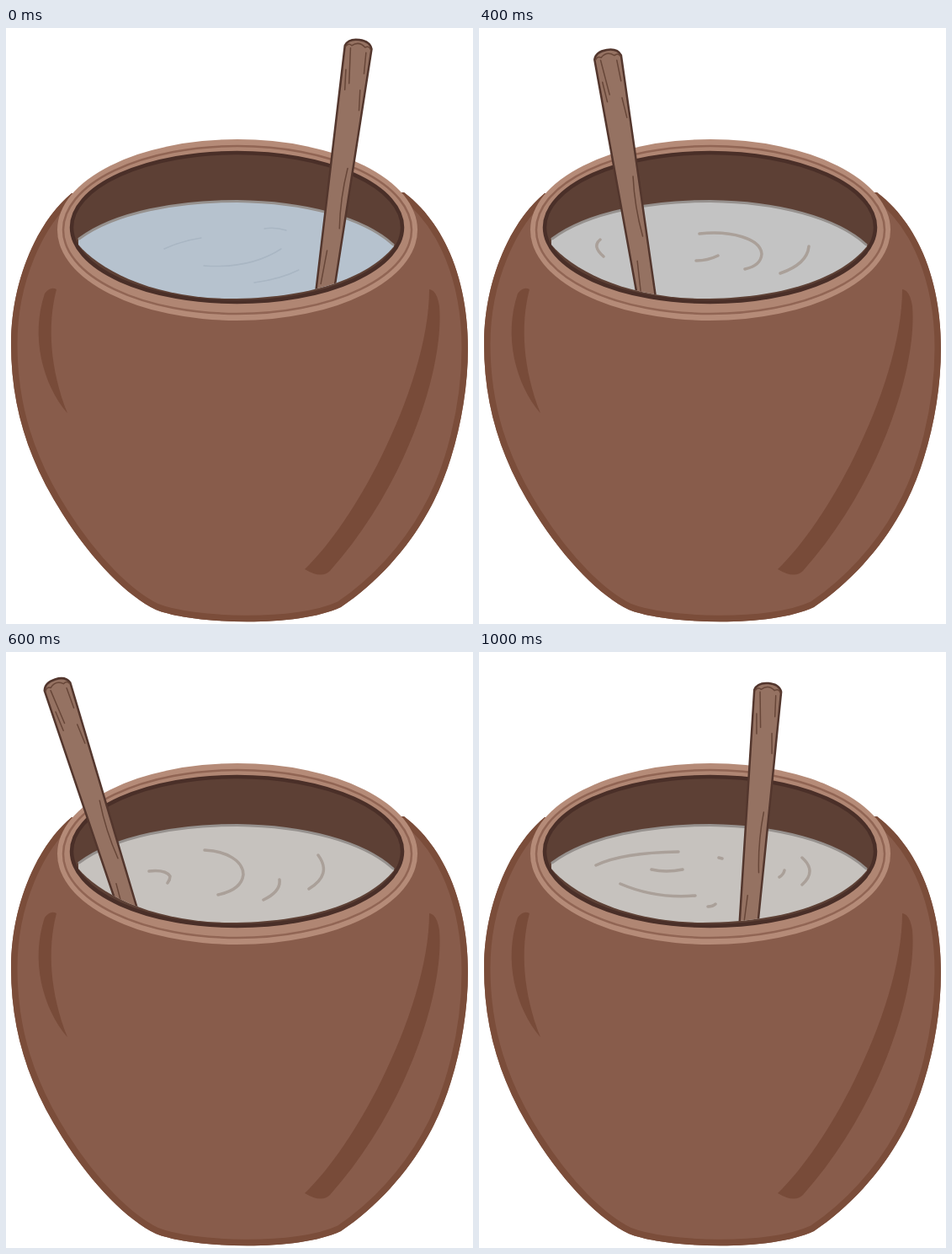
These frames come from a looping animation (555x707 px, 1.2 s). An HTML page:

```html
<!DOCTYPE html>
<html lang="en">
<head>
<meta charset="utf-8">
<title>Stirring pot</title>
<style>
  html, body { margin: 0; height: 100%; overflow: hidden; background: #fff; }
  svg { display: block; width: 100%; height: 100%; }
  path, ellipse { stroke-linecap: round; stroke-linejoin: round; }
</style>
</head>
<body>
<svg viewBox="0 0 555 707">
  <defs>
    <path id="body" d="M78 196C37 230 6 300 6 375C6 448 26 512 67 576C104 634 145 674 178 690
      C220 707 345 712 398 687C440 659 477 618 501 575C530 525 549 448 549 380C549 300 522 232 473 195Z"/>
    <clipPath id="inBody"><use href="#body"/></clipPath>
    <clipPath id="dip"><path d="M0 0H555V250H461V259C430 297 360 321 265 321C170 320 110 285 86 257V250H0Z"/></clipPath>
  </defs>

  <use href="#body" fill="#885c4b"/>
  <use href="#body" fill="none" stroke="#7b4d3a" stroke-width="15" clip-path="url(#inBody)"/>
  <path fill="#784b39" d="M46 315Q53 306 60 310C49 352 52 404 73 457C43 422 29 365 46 315Z"/>
  <path fill="#784b39" d="M503 310Q512 311 515 330C521 400 478 540 385 644Q375 654 355 642
    C420 580 503 418 503 310Z"/>

  <ellipse cx="275" cy="239.5" rx="214" ry="107.5" fill="#b58b78"/>
  <ellipse cx="275" cy="239.5" rx="207" ry="99.5" fill="#b08673" stroke="#916554" stroke-width="2.5"/>
  <ellipse cx="274.5" cy="236.5" rx="196.5" ry="88.5" fill="#5d4035" stroke="#4a2f28" stroke-width="4.5"/>

  <path id="water" d="M86 250C130 218 205 205 275 205C355 206 425 225 461 257V259
    C430 297 360 321 265 321C170 320 110 285 86 257Z"/>
  <path fill="none" stroke="#96918e" stroke-width="3" d="M87 250C130 218 205 205.5 275 205.5C355 206.5 425 225 460 257"/>
  <path id="ripples" fill="none"/>

  <g clip-path="url(#dip)">
    <g id="stick" fill="none" stroke="#674638" stroke-width="1.5">
      <path fill="#957262" stroke="#53362d" stroke-width="2.5"
        d="M-16 10Q-13 1 0 1Q13 1 16 10L10 335H-10Z"/>
      <path d="M-15 11Q-12 6 -8 9Q0 2 8 9Q13 6 15 11M-9 12L-5 54M-11 38L-9 62M10 15L11 40M9 60L11 84
        M7 154Q3 190 7 226M-4 254L-6 294"/>
    </g>
  </g>
</svg>
<script>
const blue = "#b6c2ce", grey = "#c6c2be", line = "#aaa099";
// stick: top x, top y, lean in degrees
const poses = [
  { stick: [420, 13, 7.8], water: blue, ink: "#a9b6c3", wide: 1.5,
    d: "M188 262Q210 252 232 249M235 282Q290 286 327 262M307 238Q320 236 333 240M295 302Q326 298 348 287" },
  { stick: [283, 14, -0.8], water: blue, ink: "#b0bcc9", wide: 1.5,
    d: "M190 265Q205 254 238 249M315 248Q372 262 333 284" },
  { stick: [151.5, 25, -9.2], water: "#c3c3c3", ink: line, wide: 3.5,
    d: "M144 251Q134 259 148 271M262 244C300 240 335 250 336 268Q335 282 316 286M258 276Q272 276 284 270M392 259Q390 280 358 291" },
  { stick: [58, 31.5, -17.6], water: grey, ink: line, wide: 3.5,
    d: "M170 260Q190 258 195 266Q195 270 192 274M236 235C262 236 282 248 282 264Q280 282 252 288M325 270Q327 284 306 294M371 241Q388 264 360 281" },
  { stick: [227, 26, -2.4], water: grey, ink: line, wide: 3.5,
    d: "M177 251Q194 248 204 254M149 270Q160 283 187 282M278 239Q330 238 362 259M330 268Q335 288 295 293M404 258Q404 274 389 282" },
  { stick: [344, 36, 4.7], water: grey, ink: line, wide: 3.5,
    d: "M139 253Q170 238 237 237M205 258Q222 262 242 258M168 275Q210 293 257 289M285 244L289 245M272 302Q278 302 281 299M384 244Q402 260 384 276M363 259Q362 264 357 267" }
];
const byId = id => document.getElementById(id);
const set = (id, attrs) => {
  for (const name in attrs) byId(id).setAttribute(name, attrs[name]);
};

function draw(ms) {
  const { stick: [x, y, lean], water, ink, wide, d } = poses[Math.floor(ms / 200) % poses.length];
  set("stick", { transform: `translate(${x} ${y}) rotate(${lean})` });
  set("water", { fill: water });
  set("ripples", { d, stroke: ink, "stroke-width": wide });
}

let start;
function tick(now) {
  start ??= now;
  draw(now - start);
  requestAnimationFrame(tick);
}
draw(0);
requestAnimationFrame(tick);
</script>
</body>
</html>
```
